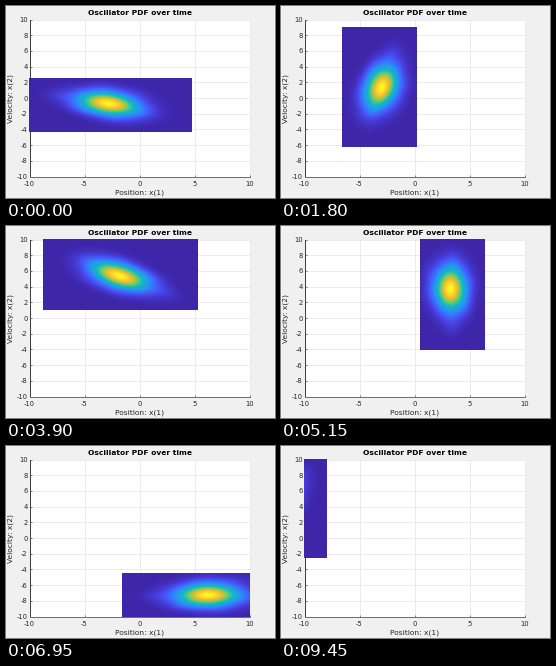
Animation, 269 px wide and 192 px high, one loop 9500 ms. Source, as a matplotlib script:

```python
import numpy as np
import matplotlib.pyplot as plt
from matplotlib.animation import FuncAnimation
from matplotlib.colors import LinearSegmentedColormap
from matplotlib.transforms import Bbox

W, H, DPI = 269, 192, 100
PX = 72 / DPI                        # points per pixel
FRAMES, STEP = 190, 50
LEFT, RIGHT, TOP, BOTTOM = 23.5, 243.5, 13.5, 170.5
INK = "#262626"

# The cloud is an ellipse that turns rigidly in phase space
MAJOR, MINOR = 7.8, 2.93             # half extents of the sampled region
SIGMA_P, SIGMA_Q = 2.0, 0.97         # spread along both axes
SHIFT_Q = 0.2                        # peak offset from the region's centre
ANGLE0, TURN = -14, -49.7            # degrees, degrees per second

# Key states: time (s), position + velocity * i
KEYS = [(0, -2.85 - 0.9j), (0.8, -2.3 - 0.9j), (1.1, -3.1 + 0.1j),
        (2.65, -3.5 + 2j), (3.9, -1.7 + 5.5j), (5.15, 3.45 + 3.75j),
        (6.3, 6.5 - 1.55j), (6.95, 6.25 - 7.5j), (8.3, -7.4 - 8.05j),
        (9.45, -13 + 4.2j)]

PARULA = LinearSegmentedColormap.from_list("parula", [
    "#3e26a8", "#473ddb", "#455cfa", "#2e83fb", "#249fe5", "#12b1cd",
    "#31c69f", "#81cc59", "#dcbc2d", "#fec737", "#f9fb15"])

rng = np.random.default_rng(4)
LUMPS = [(rng.uniform(1.3, 2.4), rng.uniform(0, 2 * np.pi),
          rng.uniform(-0.03, 0.05)) for _ in range(14)]


def turn(t):
    """Free rotation of the phase plane after t seconds."""
    return np.exp(1j * np.radians(TURN * t))


# In the turning frame the centre only drifts slowly
TIMES = np.array([t for t, _ in KEYS])
DRIFT = np.array([z / turn(t) for t, z in KEYS])
SLOPES = np.gradient(DRIFT, TIMES)


def centre(t):
    """Cubic Hermite drift, turned back into position and velocity."""
    k = min(np.searchsorted(TIMES, t, side="right") - 1, len(TIMES) - 2)
    h = TIMES[k + 1] - TIMES[k]
    s = (t - TIMES[k]) / h
    drift = ((1 + 2 * s) * (1 - s) ** 2 * DRIFT[k]
             + s * (1 - s) ** 2 * h * SLOPES[k]
             + s * s * (3 - 2 * s) * DRIFT[k + 1]
             + s * s * (s - 1) * h * SLOPES[k + 1])
    z = drift * turn(t)
    return z.real, z.imag


def cloud(t, n=70):
    """Density on a grid and the rectangle that it covers."""
    x, v = centre(t)
    a = np.radians(ANGLE0 + TURN * t)
    c, s = np.cos(a), np.sin(a)
    hx = np.hypot(MAJOR * c, MINOR * s)
    hv = np.hypot(MAJOR * s, MINOR * c)
    gx, gv = np.meshgrid(np.linspace(-hx, hx, n), np.linspace(-hv, hv, n))
    p = (gx * c + gv * s) / SIGMA_P
    q = (gv * c - gx * s - SHIFT_Q) / SIGMA_Q
    pdf = np.exp(-(p * p + q * q) / 2)
    for r, phi, amp in LUMPS:
        d2 = (p - r * np.cos(phi)) ** 2 + (q - r * np.sin(phi)) ** 2
        pdf += amp * np.exp(-d2 / 0.5)
    pdf = np.clip(pdf, 0, None)
    return pdf / pdf.max(), (x - hx, x + hx, v - hv, v + hv)


plt.rcParams["font.family"] = "DejaVu Sans"
fig = plt.figure(figsize=(W / DPI, H / DPI), dpi=DPI, facecolor="#f0f0f0")
ax = fig.add_axes([LEFT / W, 1 - BOTTOM / H,
                   (RIGHT - LEFT) / W, (BOTTOM - TOP) / H])
im = ax.imshow(np.zeros((2, 2)), cmap=PARULA, vmin=0, vmax=1, origin="lower",
               aspect="auto", interpolation="bilinear", zorder=5)
im.set_clip_path(None)
im.set_clip_box(Bbox.from_extents(LEFT - 0.5, H - BOTTOM - 0.5,
                                  RIGHT + 0.5, H - TOP + 0.5))
ax.set(xlim=(-10, 10), ylim=(-10, 10),
       xticks=range(-10, 11, 5), yticks=range(-10, 11, 2))
ax.set_axisbelow(True)
ax.grid(color="#ebebeb", lw=PX, clip_on=False)
ax.tick_params(direction="in", length=2 * PX, width=PX, color="#808080",
               labelbottom=False, labelleft=False)
ax.spines[["top", "right"]].set_visible(False)
ax.spines["left"].set(color="#404040", linewidth=PX)
ax.spines["bottom"].set(color="#707070", linewidth=PX)


def label(x, y, text, size, **kw):
    """Text at a pixel position measured from the top left."""
    kw = {"ha": "center", "va": "center", "color": INK, **kw}
    fig.text(x / W, 1 - y / H, text, fontsize=size * PX, **kw)


for val in range(-10, 11, 5):
    label(LEFT + 11 * (val + 10), 177.5, str(val), 6.8,
          va="center_baseline")
for val in range(-10, 11, 2):
    label(21.5, BOTTOM - 7.85 * (val + 10), str(val), 6.8, ha="right",
          va="center_baseline")
label(133.5, 7, "Oscillator PDF over time", 7.5, weight="bold", color="black")
label(134, 187, "Position: x(1)", 7.5)
label(4.5, 92, "Velocity: x(2)", 7.5, rotation=90)


def update(i):
    pdf, box = cloud(i * STEP / 1000)
    im.set_data(pdf)
    im.set_extent(box)
    return im,


anim = FuncAnimation(fig, update, frames=FRAMES, interval=STEP,
                     repeat=True, repeat_delay=0, blit=False)
plt.show()
```
